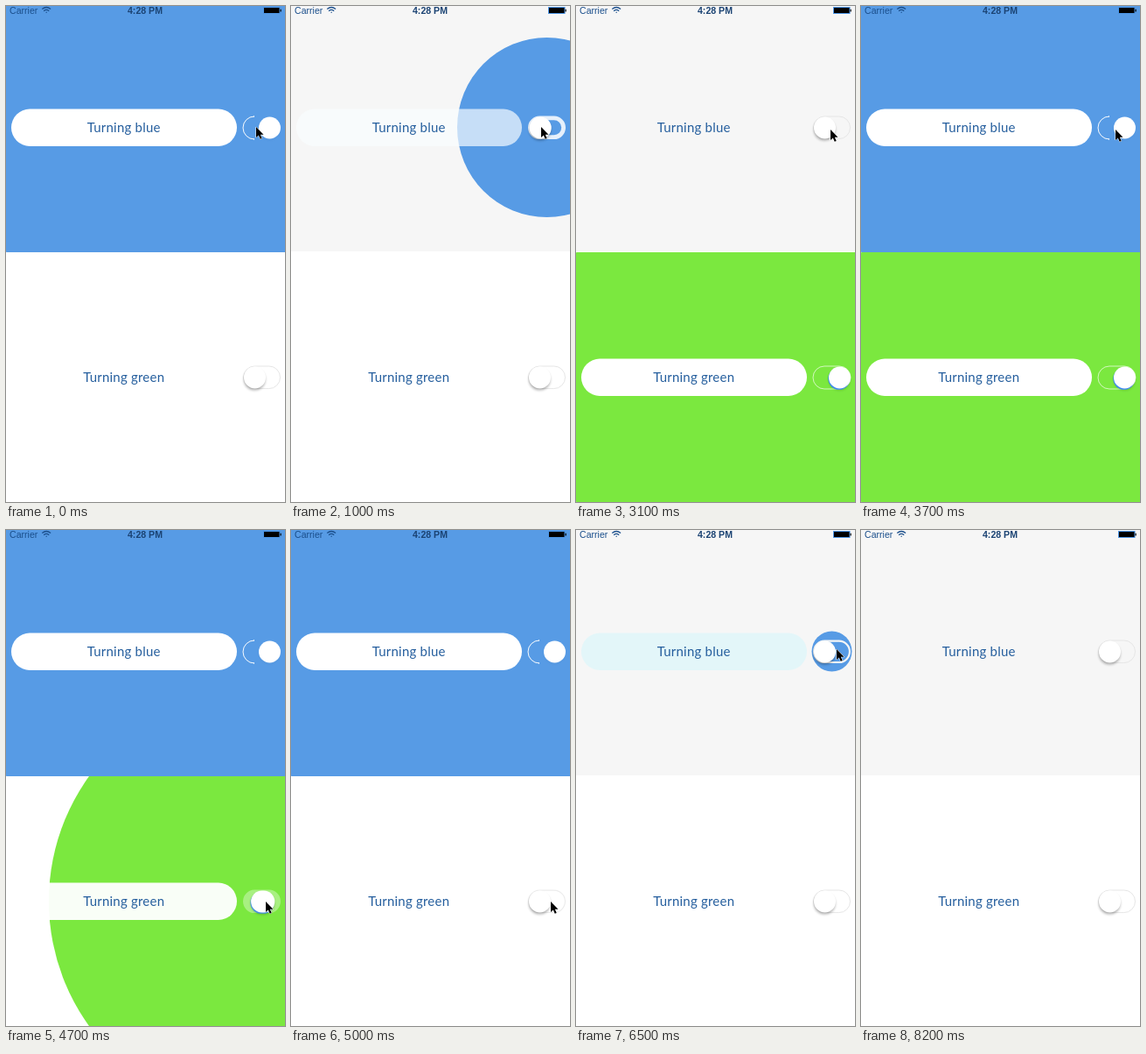
Recreate the animation shown at these times as an HTML page. Size 319 px wide and 566 px high, loop 9600 ms.

```html
<!DOCTYPE html>
<html lang="en">
<head>
<meta charset="utf-8">
<title>Paper switches</title>
<style>
  html, body { margin: 0; width: 100%; height: 100%; overflow: hidden; background: #fff; }
  svg { display: block; width: 100%; height: 100%; }
  .label { font: 15px Lato, "Open Sans", sans-serif; letter-spacing: .22px; fill: #265f9e; text-anchor: middle; }
  .status { font: 10.6px "Liberation Sans", Arial, sans-serif; fill: #1b4f8c; }
  .bold { font-weight: bold; text-anchor: middle; fill: #1b4373; }
</style>
</head>
<body>
<svg id="stage" viewBox="0 0 319 566">
  <defs>
    <clipPath id="top"><rect width="319" height="281"/></clipPath>
    <clipPath id="bottom"><rect y="281" width="319" height="285"/></clipPath>
    <filter id="blur" x="-50%" y="-50%" width="200%" height="200%"><feGaussianBlur stdDeviation="1.6"/></filter>
  </defs>
  <rect width="319" height="566" fill="#fff"/>
  <rect width="319" height="280" fill="#f6f6f6"/>
  <g id="panels"></g>
  <text class="status" x="4" y="8.5">Carrier</text>
  <g fill="none" stroke="#1b4f8c" stroke-width="1.3">
    <path d="M41.3 3.6Q46.2 -.6 51.1 3.6M43.2 5.7Q46.2 3.2 49.2 5.7"/>
    <circle cx="46.2" cy="7.3" r=".7" fill="#1b4f8c" stroke="none"/>
  </g>
  <text class="status bold" x="159" y="8.5">4:28 PM</text>
  <rect x="294.5" y="1.5" width="18.5" height="7" fill="#000" stroke="#4a92e2"/>
  <path d="M313.5 3.8h1.2v2.6h-1.2z" fill="#000"/>
  <path id="cursor" d="M0 0V12L2.8 9.4 4.7 13.8 6.7 12.9 4.8 8.7H8.5Z" fill="#000" stroke="#fff" paint-order="stroke"/>
</svg>
<script>
const LOOP = 9600, STEP = 100, FULL = 325, SLIDE = 350;
const $ = id => document.getElementById(id);
const clamp = v => Math.max(0, Math.min(1, v));
const mix = (a, b, k) => a + (b - a) * k;

// cubic-bezier(.42, 0, 1, 1), solved by bisection
function easeIn(x) {
  let lo = 0, hi = 1, s = .5;
  for (let i = 0; i < 24; i++) {
    s = (lo + hi) / 2;
    const at = 3 * (1 - s) ** 2 * s * .42 + 3 * (1 - s) * s * s + s ** 3;
    if (at < x) lo = s; else hi = s;
  }
  return 3 * (1 - s) * s * s + s ** 3;
}
const easeOut = x => 1 - easeIn(1 - x);

// events: press time, release time, resulting state
const switches = [
  { id: 'blue', clip: 'top', text: 'Turning blue', color: '#579be5', y: 138.5, on: 1, glow: 0,
    edge: 'M283 126H284A13 13 0 0 0 284 152H283', edgeAlpha: .95,
    events: [[650, 825, 0], [3220, 3348, 1], [5950, 6225, 0]] },
  { id: 'green', clip: 'bottom', text: 'Turning green', color: '#7be83f', y: 423.5, on: 0, glow: 1,
    edge: 'M284 126H301A13 13 0 0 1 301 152H284A13 13 0 0 1 284 126', edgeAlpha: .65,
    events: [[1920, 2062, 1], [4500, 4644, 0]] }
];

$('panels').innerHTML = switches.map(s => `
  <g clip-path="url(#${s.clip})"><circle id="${s.id}-disc" cx="292.5" cy="${s.y}" fill="${s.color}"/></g>
  <g transform="translate(0 ${s.y - 138.5})">
    <rect id="${s.id}-pill" x="6" y="117.6" width="258" height="42.3" rx="21.1"/>
    <text class="label" x="134.7" y="143.5">${s.text}</text>
    <rect id="${s.id}-ring" fill="none"/>
    <path id="${s.id}-edge" d="${s.edge}" fill="none" stroke="#fff"/>
    <rect id="${s.id}-shade" y="129.3" height="24.2" rx="12" fill="#000" filter="url(#blur)"/>
    <rect id="${s.id}-glow" y="127.8" height="25" rx="12.5" fill="#3b88ee"/>
    <rect id="${s.id}-knob" y="126.5" height="25" rx="12.5" fill="#fff"/>
  </g>`).join('');

function set(id, attrs) {
  for (const name in attrs) $(id).setAttribute(name, attrs[name]);
}

function drawSwitch(s, t) {
  let on = s.on, since = 1e5, press = 0;
  for (const [down, up, state] of s.events) {
    if (t >= up) { on = state; since = t - up; press = 1; }
    else if (t >= down) press = 2 + clamp((t - down) / 100);
  }
  const run = clamp(since / SLIDE), grow = easeIn(run);
  const moved = 1 - (1 - clamp(since / 215)) ** 2;
  const pos = on ? moved : 1 - moved;
  const stretch = press >= 2 ? press - 2 : press ? 1 - moved : 0;

  set(s.id + '-disc', { r: FULL * (on ? grow : 1 - easeOut(run)) });

  // the pill is a pale cyan while faint and turns white as it fills in
  const cover = on ? grow : 1 - grow, white = clamp(cover * 1.4);
  set(s.id + '-pill', {
    opacity: cover,
    fill: `rgb(${Math.round(mix(130, 255, white))},${Math.round(mix(234, 255, white))},255)`
  });

  // the track outline starts as a filled capsule and thins out when switched off
  const fade = clamp(since / 400);
  const w = on ? 1 : 1 + 12 * (1 - fade) ** 2;
  const tone = on ? 150 : Math.round(mix(255, 230, clamp(fade * 2 - 1)));
  set(s.id + '-ring', {
    x: 271 + w / 2, y: 125.5 + w / 2, width: 43 - w, height: 26.6 - w, rx: (26.6 - w) / 2,
    stroke: `rgb(${tone},${tone},${tone})`, 'stroke-width': w,
    opacity: on ? .3 * (1 - run) : clamp(.1 + since * .0043)
  });
  set(s.id + '-edge', { opacity: on ? s.edgeAlpha * grow ** 2 : 0 });

  const width = 25 + 4 * stretch, x = 272 + (17 - 4 * stretch) * pos;
  set(s.id + '-shade', { x, width: width - .5, opacity: mix(.3, s.glow ? .16 : .02, pos) });
  set(s.id + '-glow', { x: x - .7, width, opacity: s.glow * clamp(pos * 1.6) });
  set(s.id + '-knob', { x, width });
}

// time, x, y of the pointer tip
const path = [
  [0, 286, 138], [1350, 286, 138], [1750, 296, 422], [2650, 296, 422], [3100, 291, 141],
  [3900, 291, 141], [4400, 297, 424], [5050, 297, 424], [5500, 300, 138], [5800, 298, 136],
  [7150, 298, 136], [7200, 298, 138], [LOOP, 298, 138]
];

function drawCursor(t) {
  const i = path.findIndex(p => p[0] > t);
  const a = path[i - 1], b = path[i];
  const k = (t - a[0]) / (b[0] - a[0]), e = k * k * (3 - 2 * k);
  set('cursor', {
    transform: `translate(${mix(a[1], b[1], e)} ${mix(a[2], b[2], e)})`,
    opacity: t < 8200 ? 1 : 0
  });
}

const start = performance.now();
function draw() {
  const t = Math.floor(((performance.now() - start) % LOOP) / STEP) * STEP;
  switches.forEach(s => drawSwitch(s, t));
  drawCursor(t);
  requestAnimationFrame(draw);
}
draw();
</script>
</body>
</html>
```
